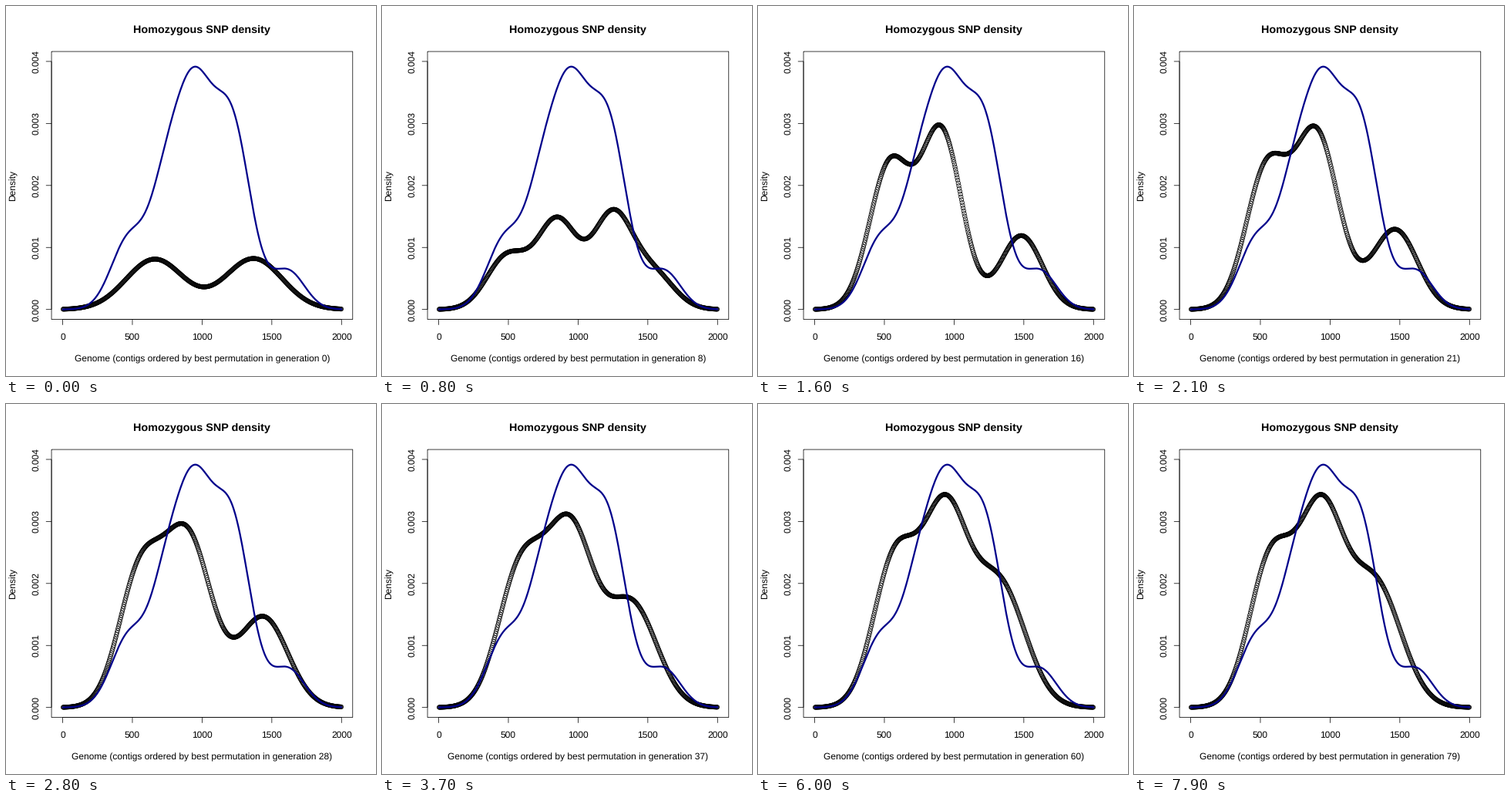
Write a matplotlib script that moves like this. It is 480x480 px and loops after 8 s.

```python
import numpy as np
import matplotlib.pyplot as plt
from matplotlib.animation import FuncAnimation
from matplotlib.collections import PolyCollection

plt.rcParams["font.family"] = "Liberation Sans"
plt.rcParams["text.hinting"] = "none"

SIZE, DPI = 480, 72
FRAMES, STEP = 80, 100

# Plot box: margins of 4.1, 2.1, 4.1 and 5.1 lines of text
LINE = 14.4
LEFT, RIGHT = 4.1 * LINE, SIZE - 2.1 * LINE
TOP, BOTTOM = 4.1 * LINE, SIZE - 5.1 * LINE
MID_X, MID_Y = (LEFT + RIGHT) / 2, (TOP + BOTTOM) / 2


def px(x):
    return LEFT + (RIGHT - LEFT) * (x / 2000 + 0.04) / 1.08


def py(d):
    """Pixel row of a density given in thousandths."""
    return BOTTOM - (BOTTOM - TOP) * (d / 4 + 0.04) / 1.08


def density(x, bumps):
    """Sum of Gaussian bumps, each (centre, height, width)."""
    return sum(h * np.exp(-0.5 * ((x - c) / w) ** 2) for c, h, w in bumps)


expected = [(470, 1.10, 125), (735, 1.68, 118), (945, 3.20, 130),
            (1215, 2.90, 133), (1615, 0.62, 120)]

twin = [(660, 0.81, 205), (1370, 0.82, 205)]
triple = [(490, 0.85, 145), (850, 1.42, 145),
          (1250, 1.52, 145), (1550, 0.53, 145)]
early = [(540, 2.32, 147), (907, 2.86, 147), (1482, 1.19, 150)]
skewed = [(550, 2.03, 152), (892, 2.75, 175), (1440, 1.45, 175)]
bell = [(620, 2.32, 165), (975, 3.00, 158), (1345, 1.98, 175)]
final = [(575, 2.35, 155), (932, 3.04, 162), (1322, 1.98, 188)]

# Generation at which the best permutation has each shape
course = [(0, twin), (8, triple), (9, triple), (16, early),
          (28, skewed), (45, bell), (54, bell), (60, final)]

sites = np.linspace(3, 1998, 512)
gens = [g for g, _ in course]
profiles = np.array([density(sites, bumps) for _, bumps in course])

angle = np.linspace(0, 2 * np.pi, 24, endpoint=False)
ring = 2.7 * np.column_stack([np.cos(angle), np.sin(angle)])


def rings(gen):
    weights = [np.interp(gen, gens, row) for row in np.eye(len(gens))]
    centres = np.column_stack([px(sites), py(weights @ profiles)])
    return centres[:, None, :] + ring


fig = plt.figure(figsize=(SIZE / DPI, SIZE / DPI), dpi=DPI, facecolor="white")
ax = fig.add_axes([0, 0, 1, 1])
ax.set_xlim(0, SIZE)
ax.set_ylim(SIZE, 0)
ax.axis("off")


def rule(xs, ys):
    ax.plot(xs, ys, color="black", lw=0.75, snap=False,
            solid_capstyle="butt", zorder=3)


def label(x, y, s, size=12, **kw):
    return ax.text(x, y, s, size=size, ha="center", va="baseline",
                   rotation_mode="anchor", **kw)


rule([LEFT, RIGHT, RIGHT, LEFT, LEFT], [TOP, TOP, BOTTOM, BOTTOM, TOP])
rule([px(0), px(2000)], [BOTTOM, BOTTOM])
rule([LEFT, LEFT], [py(0), py(4)])
for v in range(0, 2001, 500):
    rule([px(v)] * 2, [BOTTOM, BOTTOM + LINE / 2])
    label(px(v), 433, str(v))
for v in range(5):
    rule([LEFT, LEFT - LINE / 2], [py(v)] * 2)
    label(42, py(v), f"{v / 1000:.3f}", rotation=90)

label(MID_X, 35, "Homozygous SNP density", size=14.4, weight="bold")
label(13, MID_Y, "Density", rotation=90)
caption = label(MID_X, 462, "")

dots = PolyCollection(rings(0), facecolors="none", edgecolors="black",
                      linewidths=0.75, zorder=2)
ax.add_collection(dots, autolim=False)
ax.plot(px(sites), py(density(sites, expected)),
        color="#00008b", lw=2.25, zorder=4)


def draw(gen):
    dots.set_verts(rings(gen))
    caption.set_text("Genome (contigs ordered by best permutation "
                     f"in generation {gen})")
    return dots, caption


anim = FuncAnimation(fig, draw, frames=FRAMES, interval=STEP,
                     repeat=True, repeat_delay=0)
plt.show()
```
